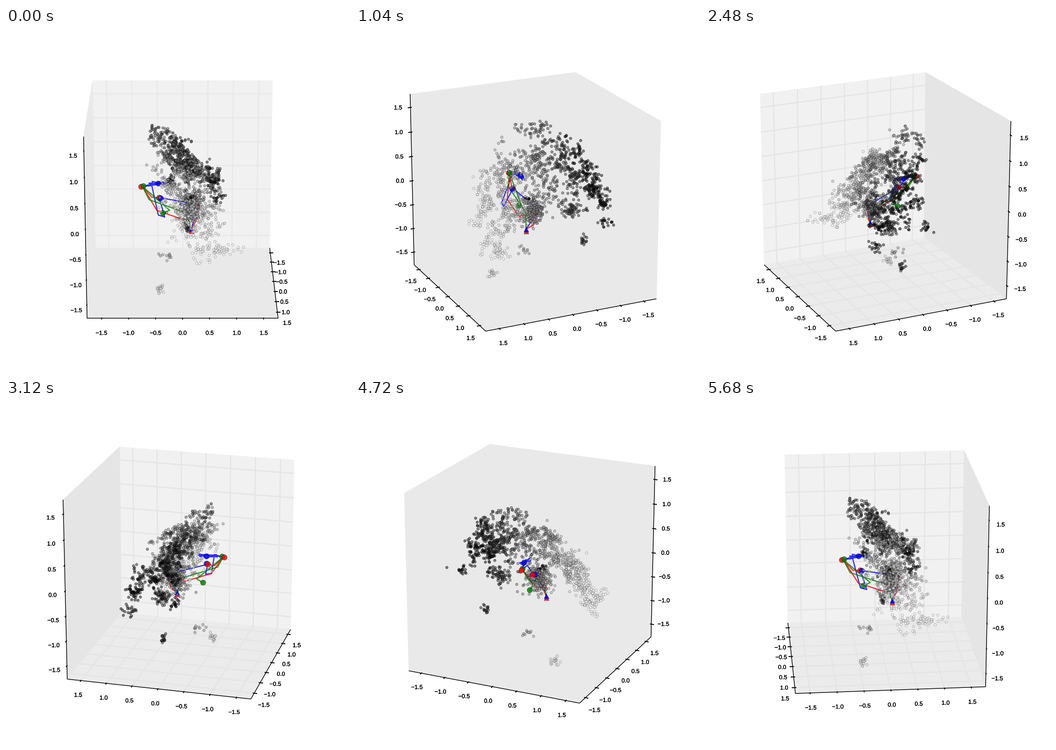
Animation of 748x748 px, one loop 5.76 s. Source, as a matplotlib script:

```python
import numpy as np
import matplotlib.pyplot as plt
from matplotlib.animation import FuncAnimation
from matplotlib.collections import LineCollection
from matplotlib.colors import to_rgba
from matplotlib.patches import Polygon
from matplotlib.patheffects import withStroke

SIZE, DPI = 748, 88
PX = 72 / DPI                  # points per pixel
FRAMES, INTERVAL = 72, 80
ELEV = np.radians(20)
DIST, SCALE = 10, 4030         # camera distance and zoom, in box widths
CENTRE = np.array([384, 364.9])
BOX = 3.5417                   # data units along one box side
TICKS = np.arange(-1.5, 1.6, 0.5)
FLIP = (1, 0, 0)               # coordinate turned to the near side, per axis
LABEL_GAP, LABEL_DROP = 0.052, 4.4

rng = np.random.default_rng(12)


def view(az):
    """Right, up and towards-the-eye vectors of the camera."""
    ca, sa, ce, se = np.cos(az), np.sin(az), np.cos(ELEV), np.sin(ELEV)
    return np.array([[-sa, ca, 0], [-se * ca, -se * sa, ce], [ce * ca, ce * sa, se]])


def project(points, cam):
    """Stage position and depth of points given in box widths."""
    right, up, toward = cam @ np.asarray(points, float).T
    depth = DIST - toward
    xy = np.column_stack([right, -up]) * (SCALE / depth)[:, None] + CENTRE
    return xy, depth


# ---- point cloud ----
def arched_sheet(hubs, per_hub):
    """Small clumps on a sheet that arches along x and slopes down along y."""
    x = rng.uniform(-0.38, 0.34, hubs)
    side = 2 * rng.beta(1.6, 2, hubs) - 1
    y = 0.01 + 0.6 * x**2 + (0.21 - 0.15 * np.abs(x)) * side
    z = 0.2 - 1.8 * (x + 0.08)**2 - 0.75 * y + rng.uniform(-0.09, 0.09, hubs)
    centres = np.repeat(np.column_stack([x, y, z]), per_hub, axis=0)
    return centres + rng.normal(0, 0.013, centres.shape)


def blob(centre, spread, n):
    return rng.normal(centre, spread, (n, 3))


specks = blob((0.04, 0.03, -0.005), 0.012, 9)
cloud = np.vstack([
    arched_sheet(215, 5),
    blob((0.02, 0.045, -0.075), (0.035, 0.03, 0.04), 230),    # dense core
    blob((-0.03, 0.03, 0), (0.13, 0.07, 0.08), 70),           # strays
    blob((-0.21, 0.05, -0.1), 0.022, 60),
    blob((-0.335, 0.17, -0.035), (0.012, 0.03, 0.012), 30),
    blob((-0.39, -0.065, -0.053), 0.012, 16),
    blob((-0.294, 0.022, -0.295), 0.01, 16),
    blob((0.01, -0.083, -0.337), 0.018, 10),
    blob((0.3, 0.22, -0.195), (0.015, 0.06, 0.015), 35),
    blob((0.19, -0.124, -0.464), 0.012, 17),
    specks,
])
tone = np.clip(0.5 + 1.3 * cloud[:, 0] - 0.2 * cloud[:, 2], 0.05, 0.95)
tone[-len(specks):] = 0

# ---- three paths with a marker at the start and balls near the end ----
START = (0.06, 0.046, -0.168)
TURN = (0.005, 0.09, -0.048)
PAIR = (0.06, -0.125, 0.011)
TOP = (0.04, -0.215, 0.068)
BLUE_END = (0.011, -0.13, 0.074)
GREEN_END = (0.033, -0.106, -0.087)

k = np.arange(10)
wiggle = np.column_stack([0.015 + 0.014 * np.sin(2.3 * k), -0.13 + 0.055 * np.sin(1.9 * k),
                          0.076 + 0.007 * np.cos(3.1 * k)])
PATHS = {
    "blue": [START, TURN, PAIR, (0.128, -0.096, -0.074), (0.125, -0.13, -0.064),
             (0.046, -0.165, 0.075), TOP, *wiggle],
    "red": [START, (0.027, 0.072, -0.136), TURN, (0.082, 0.004, -0.106),
            (0.088, -0.138, -0.051), TOP, (0.05, -0.165, 0.01), PAIR],
    "green": [START, (0.05, 0.02, -0.08), (0.06, -0.18, 0), TOP,
              (0.035, -0.07, -0.07), GREEN_END],
}
BALLS = [("red", np.add(TOP, (0, -0.007, -0.002))), ("green", np.add(TOP, (0, 0.005, 0.002))),
         ("red", PAIR), ("blue", np.add(PAIR, 0.008 * np.array([1, 1, 0]))),
         ("green", GREEN_END), ("blue", BLUE_END)]
CONES = [("red", np.add(START, (0, 0, -0.01))), ("blue", START)]

# Dots and balls share one collection so that they hide each other by depth.
n_dots, n_balls = len(cloud), len(BALLS)
spots = np.vstack([cloud, [pos for _, pos in BALLS]])
faces = np.vstack([np.column_stack([tone, tone, tone, np.full(n_dots, 0.5)]),
                   [to_rgba(c, 0.8) for c, _ in BALLS]])
rims = np.zeros((len(spots), 4))
rims[:, 3] = np.append(0.6 - 0.35 * tone, np.full(n_balls, 0.6))
areas = np.repeat([5.6 * PX, 11.5 * PX], [n_dots, n_balls])**2

# ---- stage ----
fig = plt.figure(figsize=(SIZE / DPI, SIZE / DPI), dpi=DPI, facecolor="white")
ax = fig.add_axes([0, 0, 1, 1])
ax.set_xlim(0, SIZE)
ax.set_ylim(SIZE, 0)
ax.axis("off")


def add_lines(width, z, color="black"):
    return ax.add_collection(LineCollection([], colors=color, linewidths=width * PX, zorder=z))


panes = [ax.add_patch(Polygon([(0, 0)] * 4, lw=0.5 * PX, zorder=1)) for _ in range(3)]
grid = add_lines(2.6, 1.5)
edges = add_lines(1.5, 2)
ticks = add_lines(2.2, 2.1, "#111111")
dots = ax.scatter(*spots[:, :2].T, s=areas, linewidths=0.8 * PX, zorder=4)
trails = {c: ax.plot([], [], color=c, lw=2.5 * PX, alpha=0.8, zorder=3)[0] for c in PATHS}
cones = [ax.plot([], [], "^", color=c, ms=11 * PX, mec="black", mew=0.4 * PX,
                 alpha=0.85, zorder=3.5)[0] for c, _ in CONES]
labels = [[ax.text(0, 0, f"{t:.1f}".replace("-", "\u2212"), family="Liberation Sans",
                   size=12.8 * PX, ha="center", va="center", zorder=6,
                   path_effects=[withStroke(linewidth=0.35 * PX, foreground="black")])
           for t in TICKS] for _ in range(3)]


def pane_tones(az):
    """Colours of the three panes and the grid; close tones merge when a wall is narrow."""
    if abs(np.cos(az)) < 0.46:
        return ["#e9e9e9"] * 4
    if abs(np.sin(az)) < 0.01:
        return ["#f1f1f1", "#e9e9e9", "#e9e9e9", "#e9e9e9"]
    return ["#f1f1f1", "#e5e5e5", "#ebebeb", "#e5e5e5"]


def draw_box(az, cam):
    far = np.where(cam[2] > -1e-9, -0.5, 0.5)
    tones = pane_tones(az)
    grid_lines, edge_lines, tick_lines = [], [], []
    for i in range(3):
        j, k = [a for a in range(3) if a != i]

        corners = np.tile(far, (4, 1))
        corners[[1, 2], j] *= -1
        corners[[2, 3], k] *= -1
        panes[i].set_xy(project(corners, cam)[0])
        panes[i].set_color(tones[i])

        base = far.copy()
        base[FLIP[i]] *= -1
        ends = np.tile(base, (2, 1))
        ends[:, i] = -0.5, 0.5
        edge_lines.append(project(ends, cam)[0])

        for t, label in zip(TICKS / BOX, labels[i]):
            run = np.tile(far, (3, 1))
            run[0, j] *= -1
            run[2, k] *= -1
            run[:, i] = t
            grid_lines.append(project(run, cam)[0])

            tick = np.tile(base, (2, 1))
            tick[:, i] = t
            tick[:, FLIP[i]] += np.sign(base[FLIP[i]]) * np.array([-0.008, 0.016])
            tick_lines.append(project(tick, cam)[0])

            spot = base + np.sign(base) * LABEL_GAP
            spot[i] = t
            x, y = project([spot], cam)[0][0]
            label.set_position((x, y + LABEL_DROP))
    grid.set_segments(grid_lines)
    grid.set_color(tones[3])
    edges.set_segments(edge_lines)
    ticks.set_segments(tick_lines)


def draw_data(cam):
    xy, depth = project(spots, cam)
    order = np.argsort(-depth)
    dots.set_offsets(xy[order])
    dots.set_sizes(areas[order], DPI)
    dots.set_facecolors(faces[order])
    dots.set_edgecolors(rims[order])
    for color, path in PATHS.items():
        trails[color].set_data(*project(path, cam)[0].T)
    for cone, (_, pos) in zip(cones, CONES):
        cone.set_data(*project([pos], cam)[0].T)


def update(frame):
    az = 2 * np.pi * frame / FRAMES
    cam = view(az)
    draw_box(az, cam)
    draw_data(cam)
    return []


anim = FuncAnimation(fig, update, frames=FRAMES, init_func=lambda: update(0),
                     interval=INTERVAL, repeat=True, repeat_delay=0)
plt.show()
```
